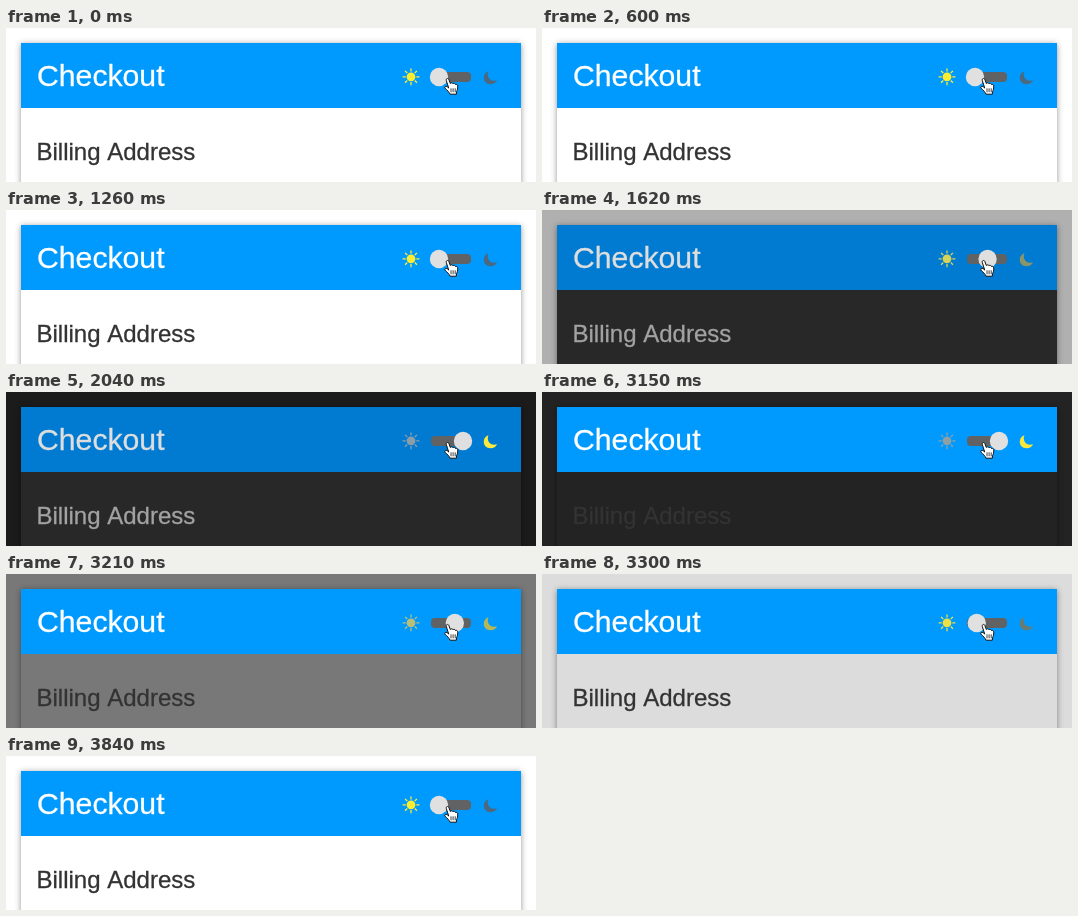
These frames come from a looping animation (530x154 px, 3.9 s). An HTML page with a canvas:

```html
<!DOCTYPE html>
<html lang="en">
<head>
<meta charset="utf-8">
<title>Checkout theme switch</title>
<style>
  html, body { margin: 0; width: 100%; height: 100%; overflow: hidden; }
  canvas { display: block; }
</style>
</head>
<body>
<canvas id="stage" width="530" height="154"></canvas>
<script>
const ctx = document.getElementById('stage').getContext('2d');
const W = 530, H = 154, LOOP = 3900;
const DARK_AT = 1554, LIGHT_AT = 3136, FADE = 300;
const SLIDE_DARK = 1560, SLIDE_LIGHT = 3167, SLIDE = 200;
const CARD = { x: 15, y: 15, w: 500, h: 180, header: 65 };
const FONT = '"Liberation Sans", Arial, sans-serif';

const THEMES = {
  light: { header: '#009aff', title: '#ffffff', text: '#333333', knob: '#e0e0e0' },
  dark: { header: '#007bd1', title: '#dedede', text: '#a2a2a2', knob: '#dfdfdf', card: '#282828' }
};
const PAGE = [[255, 255, 255], [27, 27, 27]];
const SUN = [[255, 238, 48], [139, 157, 168]];
const MOON = [[75, 105, 128], [255, 235, 59]];

// CSS "ease": cubic-bezier(.25, .1, .25, 1)
function ease(x) {
  if (x <= 0) return 0;
  if (x >= 1) return 1;
  const bezier = (a, b, u) => 3 * a * u * (1 - u) ** 2 + 3 * b * u * u * (1 - u) + u ** 3;
  let lo = 0, hi = 1;
  for (let i = 0; i < 20; i++) {
    const mid = (lo + hi) / 2;
    if (bezier(0.25, 0.25, mid) < x) lo = mid; else hi = mid;
  }
  return bezier(0.1, 1, lo);
}

const roundTrip = (t, there, back, span) => ease((t - there) / span) - ease((t - back) / span);
const mix = ([a, b], k) => `rgb(${a.map((v, i) => Math.round(v + (b[i] - v) * k))})`;

function label(text, x, y, size, color) {
  ctx.font = `${size}px ${FONT}`;
  ctx.fillStyle = ctx.strokeStyle = color;
  ctx.lineWidth = 0.3;
  ctx.fillText(text, x, y);
  ctx.strokeText(text, x, y);
}

function disc(x, y, r, color) {
  ctx.fillStyle = color;
  ctx.beginPath();
  ctx.arc(x, y, r, 0, Math.PI * 2);
  ctx.fill();
}

function drawShadow() {
  ctx.save();
  ctx.beginPath();
  ctx.rect(0, 0, W, H);
  ctx.rect(CARD.x, CARD.y, CARD.w, CARD.h);
  ctx.clip('evenodd');
  ctx.shadowColor = 'rgba(0,0,0,.42)';
  ctx.shadowBlur = 6;
  ctx.shadowOffsetY = 1;
  ctx.fillStyle = '#000';
  ctx.fillRect(CARD.x, CARD.y, CARD.w, CARD.h);
  ctx.restore();
}

function drawSun(color) {
  disc(405, 48.8, 4.4, color);
  ctx.strokeStyle = color;
  ctx.lineWidth = 1.3;
  ctx.beginPath();
  for (let i = 0; i < 8; i++) {
    const c = Math.cos(i * Math.PI / 4), s = Math.sin(i * Math.PI / 4);
    ctx.moveTo(405 + c * 5.3, 48.8 + s * 5.3);
    ctx.lineTo(405 + c * 8.4, 48.8 + s * 8.4);
  }
  ctx.stroke();
}

function drawMoon(color) {
  ctx.fillStyle = color;
  ctx.beginPath();
  ctx.moveTo(482.5, 43);
  ctx.bezierCurveTo(475.5, 46, 476.5, 56, 484.5, 56.2);
  ctx.bezierCurveTo(487.5, 56.2, 490, 54.8, 491, 52.3);
  ctx.bezierCurveTo(484.5, 54.5, 480, 48.5, 482.5, 43);
  ctx.fill();
}

function drawHand() {
  ctx.save();
  ctx.translate(438, 49.5);
  ctx.fillStyle = '#fff';
  ctx.strokeStyle = '#111';
  ctx.lineWidth = 1;
  ctx.lineJoin = ctx.lineCap = 'round';
  ctx.beginPath();
  ctx.moveTo(4.6, 10.2);
  ctx.lineTo(2.3, 3);
  ctx.bezierCurveTo(1.8, 0.8, 4.2, 0.2, 4.9, 2);
  ctx.lineTo(6.3, 6);
  ctx.bezierCurveTo(7, 4.9, 8.7, 5.1, 9, 6.3);
  ctx.bezierCurveTo(9.8, 5.4, 11.3, 5.8, 11.5, 7);
  ctx.bezierCurveTo(12.7, 6.5, 13.7, 7.2, 13.7, 8.6);
  ctx.bezierCurveTo(13.9, 11.4, 13.2, 12.7, 12.5, 14.2);
  ctx.lineTo(12.4, 16.7);
  ctx.lineTo(6, 16.7);
  ctx.bezierCurveTo(5.3, 14.4, 3, 12.8, 1.1, 10.7);
  ctx.bezierCurveTo(0.1, 9.2, 1.8, 8.2, 2.9, 9);
  ctx.closePath();
  ctx.fill();
  ctx.stroke();
  ctx.lineWidth = 0.8;
  ctx.beginPath();
  for (const x of [7, 9.1, 11.2]) {
    ctx.moveTo(x, 11.2);
    ctx.lineTo(x, 14.4);
  }
  ctx.stroke();
  ctx.restore();
}

function draw(t) {
  const theme = t >= DARK_AT && t < LIGHT_AT ? THEMES.dark : THEMES.light;
  const fade = roundTrip(t, DARK_AT, LIGHT_AT, FADE);
  const slide = roundTrip(t, SLIDE_DARK, SLIDE_LIGHT, SLIDE);

  ctx.fillStyle = mix(PAGE, fade);
  ctx.fillRect(0, 0, W, H);
  drawShadow();
  // The light card has no fill, so the fading page shows through it.
  if (theme.card) {
    ctx.fillStyle = theme.card;
    ctx.fillRect(CARD.x, CARD.y, CARD.w, CARD.h);
  }
  ctx.fillStyle = theme.header;
  ctx.fillRect(CARD.x, CARD.y, CARD.w, CARD.header);

  label('Checkout', 31, 58, 30.2, theme.title);
  label('Billing Address', 30.5, 132, 24, theme.text);

  drawSun(mix(SUN, fade));
  drawMoon(mix(MOON, fade));
  ctx.fillStyle = '#606264';
  ctx.beginPath();
  ctx.roundRect(425, 44, 40, 10, 4);
  ctx.fill();
  disc(433 + 24 * slide, 49, 9.2, theme.knob);
  drawHand();
}

function tick() {
  draw(performance.now() % LOOP);
  requestAnimationFrame(tick);
}
tick();
</script>
</body>
</html>
```
